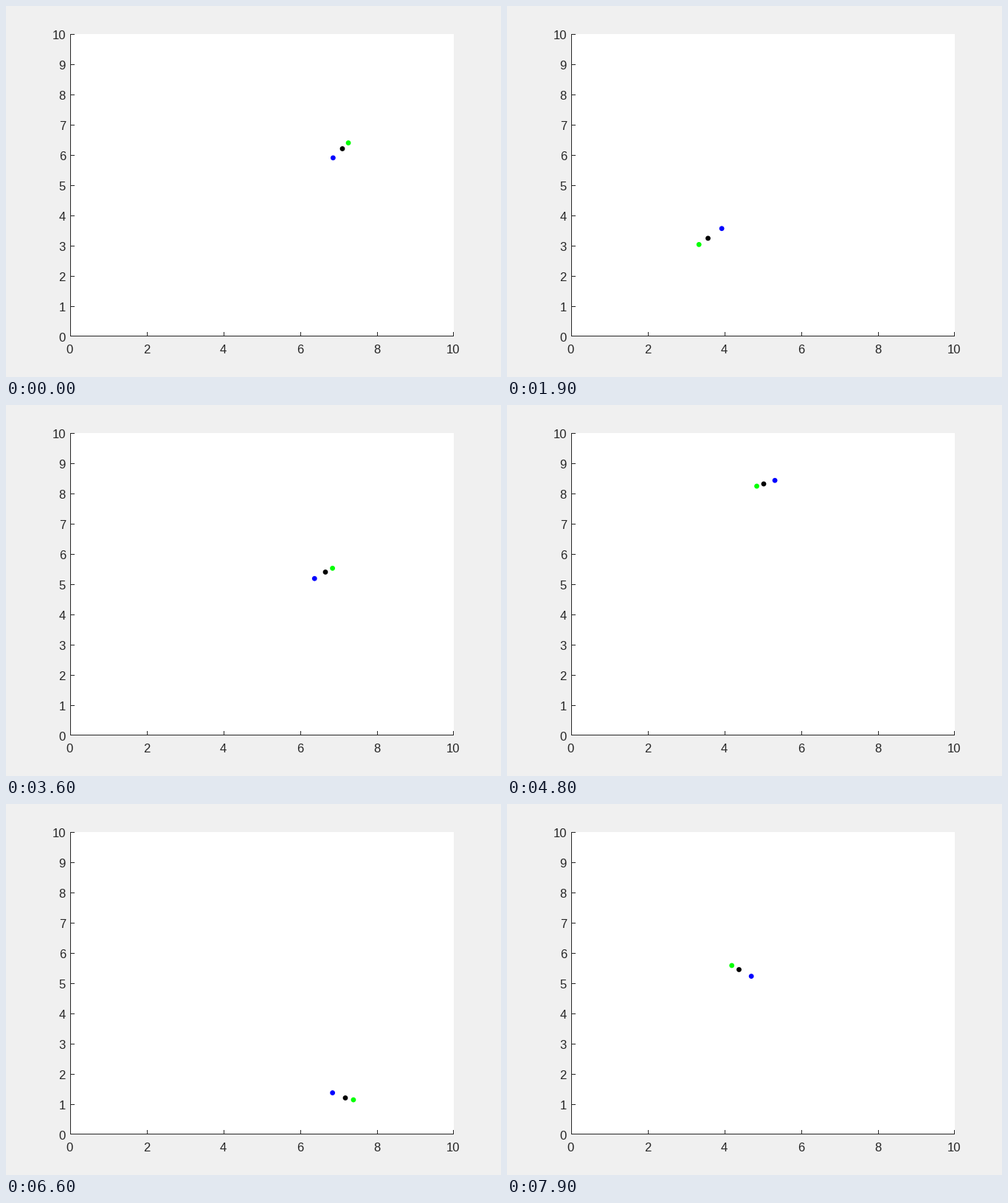
These frames come from a looping animation (671x503 px, 8 s). A matplotlib script:

```python
import numpy as np
import matplotlib.pyplot as plt
from matplotlib.animation import FuncAnimation
from matplotlib.patches import Circle, Rectangle

W, H, DPI = 671, 503, 100
FRAMES, STEP = 80, 100
LEFT, RIGHT, TOP, BOTTOM = 87, 607, 38, 448
INK = "#262626"

# Key points of the loops: step, x, y
KEYS = np.array([
    (0, 456, 193.5), (3, 528, 123), (6, 571, 80), (9, 514, 104),
    (11, 461, 147), (18, 304, 292), (24, 132, 410), (27, 202.5, 374),
    (36, 433, 226.5), (41, 571, 150), (45, 431, 92), (48, 348, 107),
    (54, 174, 201), (57.5, 111, 270), (63, 358, 342), (66, 460, 398.5),
    (70, 570, 382), (72, 524, 341), (79, 314.5, 224.5),
])
TIMES, POINTS = KEYS[:, 0], KEYS[:, 1:]
SLOPES = np.gradient(POINTS, TIMES, axis=0)

# Each dot runs along the same path: colour, steps ahead of the black one
DOTS = [("#0000ff", -0.55), ("#00ff00", 0.33), ("#000000", 0)]


def path(t):
    """Smooth cubic through the key points."""
    i = np.clip(np.searchsorted(TIMES, t, side="right") - 1, 0, len(TIMES) - 2)
    h = TIMES[i + 1] - TIMES[i]
    u = (t - TIMES[i]) / h
    ease = u * u * (3 - 2 * u)
    return (POINTS[i] * (1 - ease) + POINTS[i + 1] * ease
            + h * u * (1 - u) * (SLOPES[i] * (1 - u) - SLOPES[i + 1] * u))


plt.rcParams["font.family"] = "Liberation Sans"
fig = plt.figure(figsize=(W / DPI, H / DPI), dpi=DPI, facecolor="#f0f0f0")
ax = fig.add_axes([0, 0, 1, 1])
ax.set_xlim(0, W)
ax.set_ylim(H, 0)
ax.axis("off")


def box(x, y, w, h, color=INK):
    ax.add_patch(Rectangle((x, y), w, h, fc=color, lw=0, antialiased=False))


def label(x, y, value, align):
    ax.text(x, y, str(value), fontsize=12, color=INK, ha=align, va="baseline")


box(LEFT, TOP, RIGHT - LEFT, BOTTOM - TOP, "white")
box(LEFT, TOP, 1, BOTTOM - TOP)
box(LEFT, BOTTOM - 1, RIGHT - LEFT, 1)
for v in range(11):
    y = BOTTOM - 41 * v
    box(LEFT, min(y, BOTTOM - 1), 6, 1)
    label(81, y + 7, v, "right")
    if v % 2 == 0:
        x = LEFT + 52 * v
        box(min(x, RIGHT - 1), BOTTOM - 6, 1, 6)
        label(x - 0.5, 471, v, "center")

dots = [ax.add_patch(Circle((0, 0), 3.4, fc=color, lw=0)) for color, _ in DOTS]


def draw(n):
    for dot, (_, ahead) in zip(dots, DOTS):
        dot.center = path(n + ahead)
    return dots


anim = FuncAnimation(fig, draw, frames=FRAMES, interval=STEP,
                     repeat=True, repeat_delay=0)
plt.show()
```
